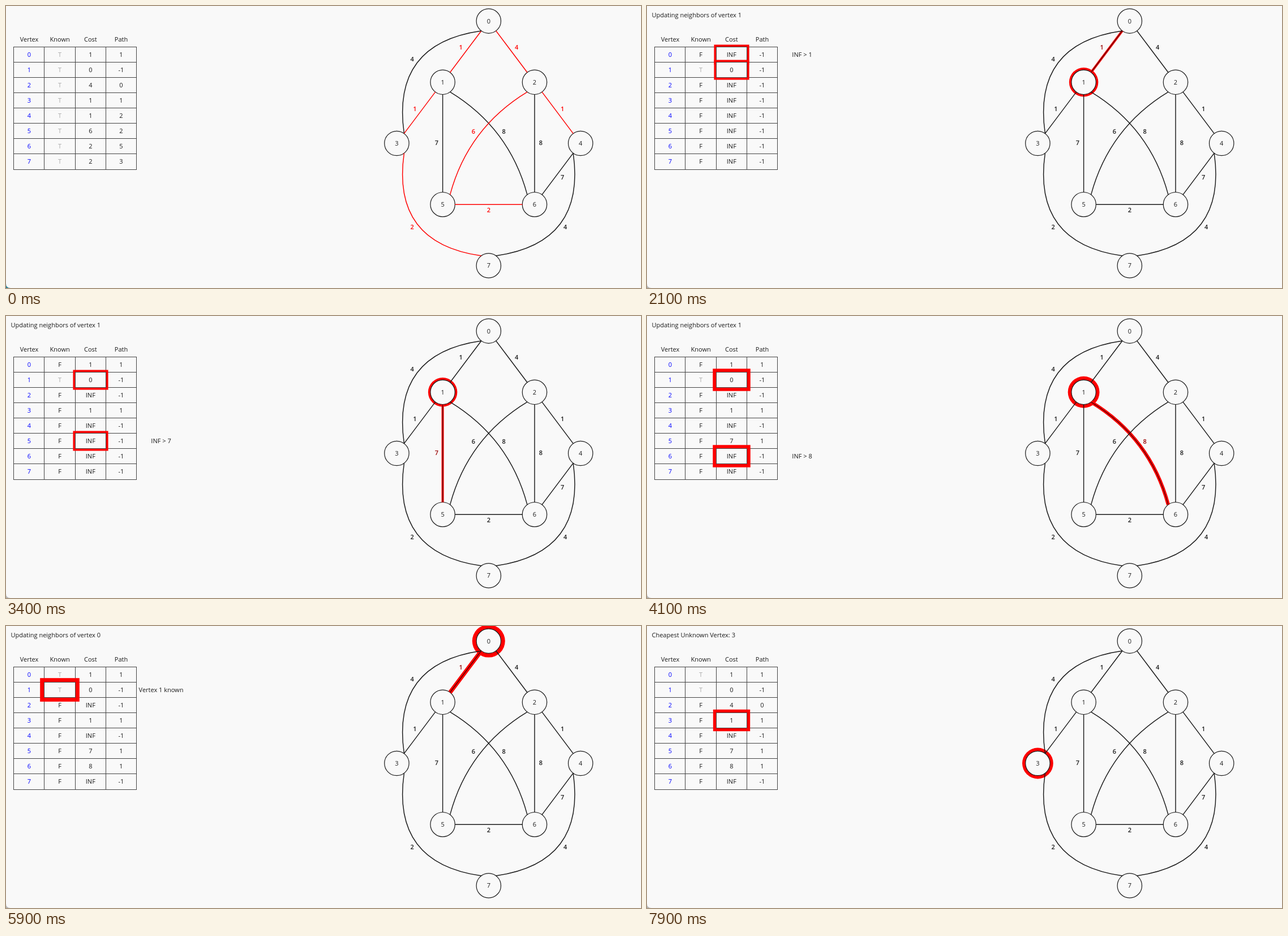
Animation, 1122 px wide and 499 px high, one loop 8 s. Source, as an HTML page with a canvas:

```html
<!DOCTYPE html>
<html>
<head>
<meta charset="utf-8">
<style>
html, body { margin: 0; width: 100%; height: 100%; overflow: hidden; background: #f9f9f9; }
canvas { display: block; }
</style>
</head>
<body>
<canvas id="stage" width="1122" height="499"></canvas>
<script>
const ctx = document.getElementById('stage').getContext('2d');
const LOOP = 8000, BG = '#f9f9f9', INK = '#1a1a1a', RED = '#f00';
const SCALE = 1.083, RADIUS = 21.7;

// Vertex positions in grid units
const vertices = [[2, 0], [1, 1], [3, 1], [0, 2], [4, 2], [1, 3], [3, 3], [2, 4]]
  .map(([x, y]) => [690.4 + x * 81.2, 26.6 + y * 108.2]);

// from, to, weight, side of the label, curvature
const edges = [
  [0, 1, 1, 1, 0], [0, 2, 4, -1, 0], [0, 3, 4, 1, .5], [1, 3, 1, 1, 0], [1, 5, 7, 1, 0],
  [1, 6, 8, -1, .2], [2, 4, 1, -1, 0], [2, 5, 6, 1, .2], [2, 6, 8, -1, 0], [3, 7, 2, 1, .5],
  [4, 6, 7, -1, 0], [4, 7, 4, -1, .5], [5, 6, 2, 1, 0]
];
const joins = (e, a, b) => (e[0] === a && e[1] === b) || (e[0] === b && e[1] === a);

// start time, action, vertex, neighbor
const steps = [
  [500, 'find'], [1150, 'pick', 1],
  [1750, 'check', 1, 0], [2350, 'check', 1, 3], [2950, 'check', 1, 5], [3550, 'check', 1, 6],
  [4150, 'find'], [4750, 'pick', 0],
  [5350, 'check', 0, 1], [6050, 'check', 0, 2], [6650, 'check', 0, 3],
  [7250, 'find'], [7750, 'pick', 3]
];

function stateAt(t) {
  const s = { known: Array(8).fill(true), cost: [1, 0, 4, 1, 1, 6, 2, 2],
    path: [1, -1, 0, 1, 2, 2, 5, 3], message: '', lit: new Set() };
  if (t < steps[0][0]) return { ...s, done: true };
  s.known.fill(false);
  s.cost.fill(Infinity)[1] = 0;
  s.path.fill(-1);
  const past = steps.filter(step => step[0] <= t);
  past.forEach(([, action, u, v], i) => {
    const current = i === past.length - 1;
    if (action === 'find' && current) {
      s.message = 'Finding Cheapest Unknown Vertex';
      s.known.forEach((k, n) => k || s.lit.add('Cost' + n));
    }
    if (action === 'pick' && current) {
      s.message = 'Cheapest Unknown Vertex: ' + u;
      s.vertex = u;
      s.lit.add('Cost' + u);
    }
    if (action !== 'check') return;
    s.known[u] = true;
    const weight = edges.find(e => joins(e, u, v))[2];
    const better = !s.known[v] && s.cost[v] > weight;
    if (current) {
      s.message = 'Updating neighbors of vertex ' + u;
      s.vertex = u;
      s.neighbor = v;
      if (s.known[v]) {
        s.lit.add('Known' + v);
        s.note = `Vertex ${v} known`;
      } else {
        s.lit.add('Cost' + u).add('Cost' + v);
        const test = `${show(s.cost[v])} > ${weight}`;
        s.note = better ? test : `!(${test})`;
      }
    } else if (better) {
      s.cost[v] = weight;
      s.path[v] = u;
    }
  });
  return s;
}

const show = n => n === Infinity ? 'INF' : String(n);

function text(str, x, y, color = INK, align = 'center', weight = 400) {
  ctx.font = `${weight} 11px "Open Sans", "Noto Sans", sans-serif`;
  ctx.textAlign = align;
  ctx.fillStyle = color;
  ctx.fillText(str, x, y + 3.9);
}

// Grid lines sit on whole pixels so that neighboring cells share them
const columnX = c => Math.floor(13.4 + c * 54.3) + .5;
const rowY = r => Math.floor(72.4 + r * 27.08) + .5;

function drawTable(s, glow) {
  const columns = ['Vertex', 'Known', 'Cost', 'Path'];
  const centerX = c => 41 + c * 54.15, centerY = r => 86 + r * 27.05;
  columns.forEach((name, c) => text(name, centerX(c), 59));
  const cells = [];
  for (let r = 0; r < 8; r++) {
    const values = [[r, '#00f'], [s.known[r] ? 'T' : 'F', s.known[r] ? '#aaa' : INK],
      [show(s.cost[r])], [s.path[r]]];
    values.forEach(([value, color], c) =>
      cells.push({ value, color, r, c, lit: s.lit.has(columns[c] + r) }));
    if (s.note && r === s.neighbor) text(s.note, 274, centerY(r));
  }
  cells.sort((a, b) => a.lit - b.lit);
  for (const { value, color, r, c, lit } of cells) {
    const x = columnX(c), y = rowY(r), w = columnX(c + 1) - x, h = rowY(r + 1) - y;
    if (lit) {
      ctx.fillStyle = RED;
      ctx.fillRect(x - glow, y - glow, w + 2 * glow, h + 2 * glow);
      ctx.fillStyle = BG;
      ctx.fillRect(x, y, w, h);
    }
    ctx.strokeStyle = '#444';
    ctx.lineWidth = 1;
    ctx.strokeRect(x, y, w, h);
    text(value, centerX(c), centerY(r), color);
  }
}

function disc(x, y, r, color) {
  ctx.beginPath();
  ctx.arc(x, y, r, 0, 7);
  ctx.fillStyle = color;
  ctx.fill();
}

function drawVertex([x, y], i, lit, glow) {
  if (lit) disc(x, y, RADIUS + glow, RED);
  disc(x, y, RADIUS, BG);
  ctx.strokeStyle = INK;
  ctx.lineWidth = 1.2;
  ctx.stroke();
  text(i, x, y);
}

function drawEdge([a, b, weight, side, curve], color, lit, glow) {
  const [ax, ay] = vertices[a], [bx, by] = vertices[b];
  const length = Math.hypot(bx - ax, by - ay);
  const dx = (bx - ax) / length, dy = (by - ay) / length;
  const nx = -dy * side, ny = dx * side;
  const mx = (ax + bx) / 2, my = (ay + by) / 2;
  const bend = curve * (length - 2 * RADIUS);
  ctx.beginPath();
  ctx.moveTo(ax + dx * RADIUS, ay + dy * RADIUS);
  ctx.quadraticCurveTo(mx + nx * bend, my + ny * bend, bx - dx * RADIUS, by - dy * RADIUS);
  if (lit) {
    ctx.strokeStyle = RED;
    ctx.lineWidth = glow;
    ctx.stroke();
  }
  ctx.strokeStyle = lit ? '#400' : color;
  ctx.lineWidth = lit ? 1.2 : 1.45;
  ctx.stroke();
  const offset = bend / 2 + 10.83;
  text(weight, mx + nx * offset, my + ny * offset - .6, lit ? '#900' : color, 'center', 600);
}

function drawCorner(color) {
  ctx.beginPath();
  ctx.moveTo(0, 491);
  ctx.quadraticCurveTo(0, 499, 8, 499);
  ctx.lineTo(0, 499);
  ctx.fillStyle = color;
  ctx.fill();
}

function draw(t) {
  const s = stateAt(t);
  const phase = (t + 450) % 1600;
  const glow = (3 + Math.abs(phase - 800) / 200) * SCALE;
  ctx.fillStyle = BG;
  ctx.fillRect(0, 0, 1122, 499);
  text(s.message, 8.5, 16, INK, 'left');
  drawTable(s, glow);
  vertices.forEach((p, i) => drawVertex(p, i, i === s.vertex, glow));
  for (const e of edges) {
    const inTree = s.done && (s.path[e[0]] === e[1] || s.path[e[1]] === e[0]);
    drawEdge(e, inTree ? RED : INK, joins(e, s.vertex, s.neighbor), glow);
  }
  drawCorner(s.done ? '#2a7f92' : '#b4b4b4');
}

const start = performance.now();
function tick() {
  draw((performance.now() - start) % LOOP);
  requestAnimationFrame(tick);
}
tick();
</script>
</body>
</html>
```
